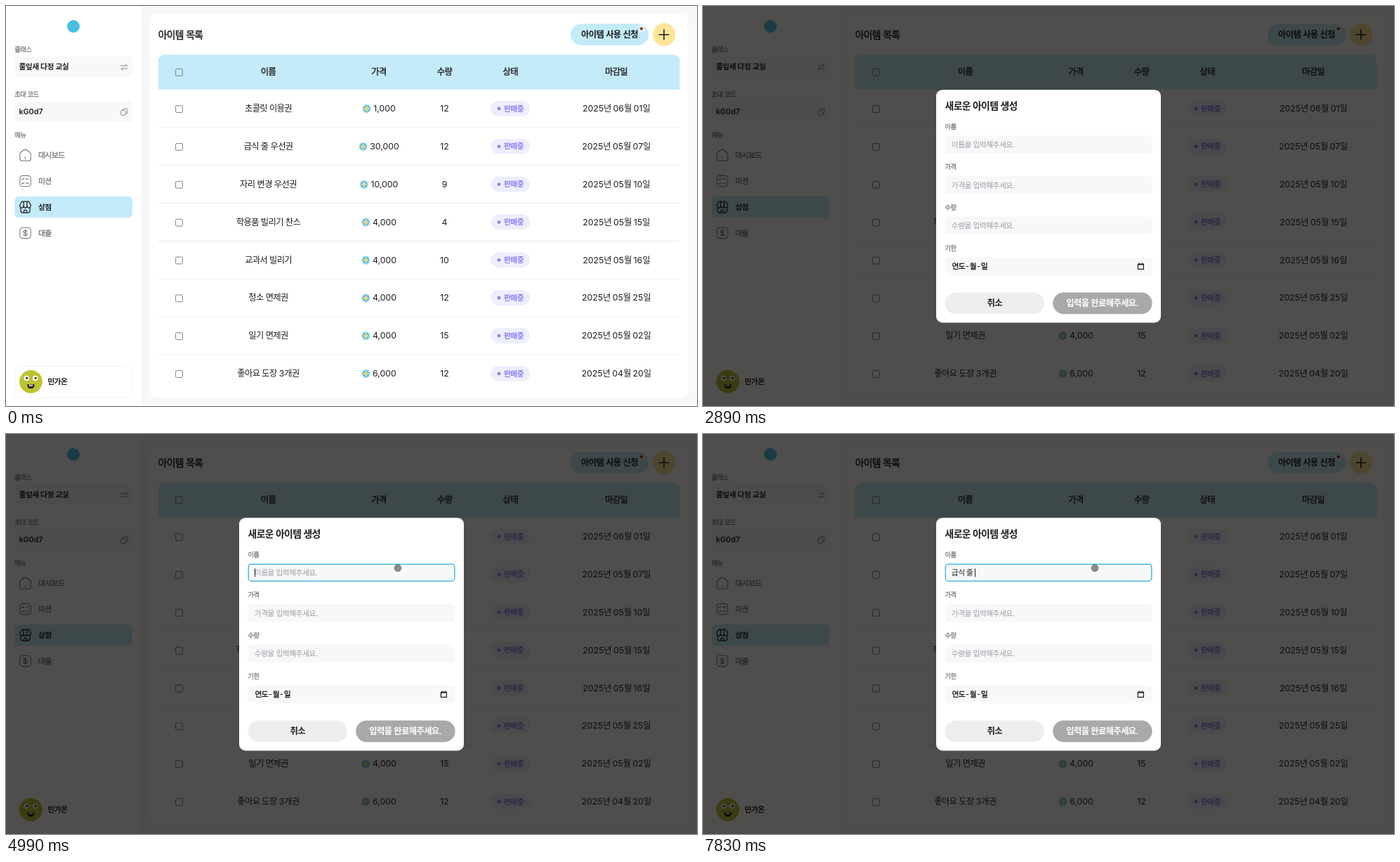
These frames come from a looping animation (984x569 px, 8000 ms). An HTML page with a canvas:

```html
<!DOCTYPE html>
<html lang="ko">
<head>
<meta charset="utf-8">
<title>아이템 목록</title>
<style>
  html, body { margin: 0; width: 100%; height: 100%; overflow: hidden; background: #f7f8fa; }
  canvas { display: block; width: 984px; height: 569px; }
</style>
</head>
<body>
<canvas id="stage" width="984" height="569"></canvas>
<script>
const ctx = document.getElementById('stage').getContext('2d');
const LOOP = 8000, TAU = Math.PI * 2;
const XS = 9.23, SM = 10.77, MD = 12.3, LG = 13.85;
const SKY = '#c4ebfa', INK = '#1e1e1e', GRAY = '#7a7b7d', PALE = '#f7f8fa', HINT = '#9c9da0';
const BLUE = '#4db9e2', RED = '#f93a3a', VIOLET = '#8a80f6';

const ROWS = [
  ['초콜릿 이용권', '1,000', '12', '06월 01일'],
  ['급식 줄 우선권', '30,000', '12', '05월 07일'],
  ['자리 변경 우선권', '10,000', '9', '05월 10일'],
  ['학용품 빌리기 찬스', '4,000', '4', '05월 15일'],
  ['교과서 빌리기', '4,000', '10', '05월 16일'],
  ['청소 면제권', '4,000', '12', '05월 25일'],
  ['일기 면제권', '4,000', '15', '05월 02일'],
  ['좋아요 도장 3개권', '6,000', '12', '04월 20일']
];
const HEADS = [['이름', 373.5], ['가격', 531], ['수량', 624.5], ['상태', 718.3], ['마감일', 869]];
const TYPING = [
  [2980, ''], [4190, 'r'], [4250, 'rm'], [4790, 'r'], [4990, ''], [5250, 'ㄱ'], [5450, '그'],
  [5580, '급'], [5920, '긊'], [6040, '급시'], [6180, '급식'], [6290, '급식 '], [6400, '급식 ㅈ'],
  [6510, '급식 주'], [6710, '급식 줄'], [6790, '급식 줄 ']
];

// Shapes
function paint(fill, stroke, lw) {
  if (fill) { ctx.fillStyle = fill; ctx.fill(); }
  if (stroke) { ctx.strokeStyle = stroke; ctx.lineWidth = lw; ctx.stroke(); }
}
function box(x, y, w, h, r, fill, stroke, lw = 0.8) {
  ctx.beginPath();
  ctx.roundRect(x, y, w, h, r);
  paint(fill, stroke, lw);
}
function disc(x, y, r, fill, stroke, lw = 0.8) {
  ctx.beginPath();
  ctx.arc(x, y, r, 0, TAU);
  paint(fill, stroke, lw);
}
function path(d, x, y, stroke, lw, fill) {
  ctx.save();
  ctx.translate(x, y);
  ctx.lineCap = ctx.lineJoin = 'round';
  const p = new Path2D(d);
  if (fill) { ctx.fillStyle = fill; ctx.fill(p); }
  if (stroke) { ctx.strokeStyle = stroke; ctx.lineWidth = lw; ctx.stroke(p); }
  ctx.restore();
}

// Text: Hangul and Latin runs use separate fonts
function runs(str, size, weight, draw) {
  let x = 0;
  for (const run of str.match(/[ㄱ-힣]+| +|[^ ㄱ-힣]+/g) || []) {
    if (run[0] === ' ') { x += run.length * size * 0.24; continue; }
    const hangul = /[ㄱ-힣]/.test(run);
    ctx.font = `${weight} ${size}px ${hangul ? '"Noto Sans CJK KR", "Noto Sans CJK"' : 'Inter'}, sans-serif`;
    ctx.letterSpacing = hangul ? `${-size * 0.05}px` : '0px';
    if (draw) draw(run, x, hangul);
    x += ctx.measureText(run).width;
  }
  return x;
}
const widthOf = (str, size, weight = 400) => runs(str, size, weight);
function text(str, x, cy, size, weight = 400, color = INK, centered = false) {
  const x0 = centered ? x - widthOf(str, size, weight) / 2 : x;
  const y = cy + size * 0.355;
  ctx.fillStyle = ctx.strokeStyle = color;
  ctx.lineWidth = size * 0.03;
  runs(str, size, weight, (run, dx, hangul) => {
    ctx.fillText(run, x0 + dx, y);
    // Hangul has no medium cut, so thicken the regular one
    if (hangul && weight === 500) ctx.strokeText(run, x0 + dx, y);
  });
}
const mid = (str, x, cy, size, weight, color) => text(str, x, cy, size, weight, color, true);

// Sidebar
function avatar(x, y) {
  disc(x, y, 16.4, '#bcc331');
  for (const dx of [-6.2, 6.2]) {
    disc(x + dx, y - 4.8, 3.8, '#fff');
    disc(x + dx + 0.6, y - 5, 1.5, INK);
  }
  path('M-5 3.6Q0 5 5 3.6Q5.4 10 0 10Q-5.4 10 -5 3.6Z', x, y, null, 0, '#231f1c');
  box(x - 2.3, y + 4.4, 2, 2.2, 0.4, '#fff');
  box(x + 0.3, y + 4.4, 2, 2.2, 0.4, '#fff');
}
function menuIcon(i, y) {
  const x = 27.5, c = i === 2 ? INK : '#77787a', w = 1.1;
  if (i === 0) {
    path('M-7.7 -1.5Q-7.7 -3 -6.5 -4L-2 -7.4Q0 -8.8 2 -7.4L6.5 -4Q7.7 -3 7.7 -1.5V5Q7.7 8 4.7 8H-4.7Q-7.7 8 -7.7 5ZM0 2.5V5', x, y, c, w);
  } else if (i === 2) {
    path('M-6.6 0V5Q-6.6 8 -3.6 8H3.6Q6.6 8 6.6 5V0M-5 -8H5L7.7 -3Q8 1 5 1Q2.5 1 2.4 -2Q2.4 1 0 1Q-2.4 1 -2.4 -2Q-2.5 1 -5 1Q-8 1 -7.7 -3ZM-2.4 -2V-8M2.4 -2V-8M-2 8V6Q-2 4.2 0 4.2Q2 4.2 2 6V8', x, y, c, 1.25);
  } else {
    box(x - 7.7, y - 7.7, 15.4, 15.4, 4, null, c, w);
    path(i === 1
      ? 'M-4.8 -3L-3.7 -2L-1.8 -4.2M-4.8 3L-3.7 4L-1.8 1.8M0.8 -3H4.6M0.8 3H4.6'
      : 'M2.5 -2Q2.5 -3.5 0 -3.5Q-2.5 -3.5 -2.5 -1.7Q-2.5 0 0 0Q2.6 0 2.6 1.8Q2.6 3.5 0 3.5Q-2.5 3.5 -2.5 2M0 -4.8V4.8', x, y, c, w);
  }
}
function sidebar() {
  box(0, 0, 192, 569, 0, '#fff');
  disc(96, 29, 9, '#49bfe6');
  text('클래스', 12.3, 62, XS, 500, GRAY);
  box(12.3, 72, 167.7, 29, 5, PALE);
  text('풀잎새 다정 교실', 18.4, 86.3, SM, 600);
  path('M-4.5 -2H4.5L2.4 -4M4.5 2H-4.5L-2.4 4', 168.3, 87, '#77787a', 0.9);
  text('초대 코드', 12.3, 126, XS, 500, GRAY);
  box(12.3, 136, 167.7, 29, 5, PALE);
  text('kG0d7', 18.4, 150.3, SM, 600);
  box(163.5, 148.5, 7, 7, 2, null, '#77787a', 0.9);
  path('M-1.5 -3V-3.2Q-1.5 -5 0.3 -5H3Q5 -5 5 -3V0Q5 2 3.2 2', 168, 151, '#77787a', 0.9);
  text('메뉴', 12.3, 183.5, XS, 500, GRAY);
  box(12.3, 270.7, 167.7, 30.6, 6, SKY);
  ['대시보드', '미션', '상점', '대출'].forEach((name, i) => {
    const y = 212.2 + i * 36.9;
    menuIcon(i, y);
    if (i === 2) text(name, 46, y, SM, 600);
    else text(name, 46, y, SM, 500, GRAY);
  });
  box(12.5, 512.5, 167.3, 44.3, 6, '#fff', '#eef0f3');
  avatar(35.4, 534.3);
  text('민가온', 59.2, 534.5, SM, 600);
}

// Item table
function coin(x, y) {
  disc(x, y, 6.3, '#b3e2f7');
  disc(x, y, 4.8, '#58b9e4');
  path('M-2.5 0H2.5M0 -2.5V2.5', x, y, '#f8df75', 2.6);
  disc(x, y, 1.1, '#9fd3de');
}
const checkbox = (y, fill) => box(241.6, y - 4.8, 9.8, 9.8, 1.2, fill, '#808284', 1);
function table() {
  box(204.5, 12.3, 767, 544.5, 9, '#fff');
  text('아이템 목록', 216.7, 41, LG, 500);
  box(804, 25.3, 111, 30.8, 15.4, SKY);
  mid('아이템 사용 신청', 859.5, 40.6, MD, 600);
  disc(905, 32.3, 4, '#fff');
  path('M0 -2.4L2.4 0L0 2.4L-2.4 0Z', 905, 32.3, '#8b3d1d', 0.8, '#8b3d1d');
  disc(937.2, 40.7, 16.1, '#fde698');
  path('M-6.8 0H6.8M0 -6.8V6.8', 937, 40.7, INK, 1.6);

  box(216.8, 69.2, 742.6, 49.7, [9, 9, 0, 0], SKY);
  checkbox(94.2, null);
  for (const [name, x] of HEADS) mid(name, x, 93.6, MD, 500);
  ROWS.forEach(([name, price, count, date], i) => {
    const y = 145.8 + i * 53.85;
    if (i < 7) box(216.8, y + 26.5, 742.6, 0.8, 0, '#e5e7ea');
    checkbox(y + 0.7, '#fff');
    mid(name, 373.5, y, MD);
    const left = 531 - (widthOf(price, MD) + 15.8) / 2;
    coin(left + 6.3, y + 0.3);
    text(price, left + 15.8, y, MD);
    mid(count, 624.5, y, MD);
    box(690.2, y - 11, 56, 22, 11, '#efeefe');
    disc(702, y + 0.2, 2.4, VIOLET);
    text('판매중', 709, y, SM, 600, VIOLET);
    mid('2025년 ' + date, 869, y, MD);
  });
}

// Dialog
const typedAt = t => TYPING.filter(k => t >= k[0]).pop() || [Infinity, ''];

function nameField(since, value, t, y) {
  const x = 353.8, focused = t >= since;
  box(344.6, y - 12.7, 294.9, 25.4, 4.6, PALE);
  if (focused) box(345.3, y - 12, 293.5, 24, 4, null, value.length === 1 ? RED : BLUE, 1.5);
  if (value) text(value, x, y, SM);
  else text('이름을 입력해주세요.', x, y, SM, 400, HINT);
  const end = x + widthOf(value, SM);
  if (/[ㄱ-힣]$/.test(value)) {
    const from = x + widthOf(value.slice(0, -1), SM);
    box(from, y + 5.3, end - from, 0.9, 0, INK);
  }
  if (focused && Math.floor((t - since) / 518) % 2 === 0) {
    box(Math.floor(end + 0.3), y - 6, 1, 12, 0, INK);
  }
}
function dialog(t) {
  const [since, value] = typedAt(t);
  const grow = value.length === 1 ? 10 : 0;
  box(332, 119.2 - grow, 320, 331.3 + 2 * grow, 9, '#fff');
  text('새로운 아이템 생성', 344.6, 142 - grow, LG, 600);
  text('이름', 344.6, 171.3 - grow, XS, 500, GRAY);
  nameField(since, value, t, 197.2 - grow);
  if (grow) text('이름은 2자 이상, 30자 이하로 입력해주세요.', 344.6, 212.7, XS, 400, RED);

  ctx.save();
  ctx.translate(0, grow);
  ['가격', '수량', '기한'].forEach((name, i) => {
    const y = 228.9 + i * 57.7;
    text(name, 344.6, y, XS, 500, GRAY);
    box(344.6, y + 13.2, 294.9, 25.4, 4.6, PALE);
    if (i < 2) text(name + '을 입력해주세요.', 353.8, y + 25.9, SM, 400, HINT);
  });
  let x = 354.5;
  for (const part of ['연도', '-', '월', '-', '일']) {
    text(part, x, 370.2, SM, 500);
    x += widthOf(part, SM, 500) + 0.8;
  }
  path('M-4 -3.2H4V4.2H-4ZM-4 -2.2H4M-2.2 -4.3V-3.4M2.2 -4.3V-3.4', 623.4, 370.2, INK, 1.2);
  box(344.6, 407.5, 141.4, 30.7, 15.35, '#eee');
  mid('취소', 415.3, 422.8, MD, 600);
  box(498.2, 407.5, 141.4, 30.7, 15.35, '#a8a9aa');
  mid('입력을 완료해주세요.', 568.9, 422.8, MD, 600, '#fff');
  ctx.restore();
}

// Pointer: eased moves held in short steps
const easeOut = p => 1 - (1 - p) ** 2;
const easeInOut = p => p * p * (3 - 2 * p);
function glide(t, start, step, count, ease, from, to) {
  const p = ease(Math.min(1, Math.floor((t - start) / step) / count));
  return from.map((v, i) => v + (to[i] - v) * p);
}
function pointerAt(t) {
  if (t < 120) return null;
  if (t < 200) return [979.5, 542.5];
  if (t < 470) return null;
  if (t < 1813) return glide(t, 470, 68, 10, easeOut, [982, 141.5], [941.5, 40.8]);
  if (t < 2630) return glide(t, 1813, 77, 8, easeInOut, [941.5, 40.8], [554.5, 210.5]);
  if (t < 2890) return [554.5, 208.5];
  if (t < 2980) return null;
  return t < 3520 ? [556.5, 190.5] : [558, 190.7];
}
function pointer(t) {
  const at = pointerAt(t);
  if (!at) return;
  const pressed = [[1150, 1290], [2630, 2770], [3120, 3180]].some(([a, b]) => t >= a && t < b);
  if (pressed) disc(...at, 9.3, 'rgba(60,60,60,.3)');
  disc(...at, 5, 'rgba(30,30,30,.5)', 'rgba(30,30,30,.3)', 1);
}

function draw(t) {
  box(0, 0, 984, 569, 0, PALE);
  sidebar();
  table();
  if (t >= 1550) {
    box(0, 0, 984, 569, 0, 'rgba(5,4,0,.7)');
    dialog(t);
  }
  pointer(t);
}
const start = performance.now();
function frame() {
  draw((performance.now() - start) % LOOP);
  requestAnimationFrame(frame);
}
frame();
</script>
</body>
</html>
```
